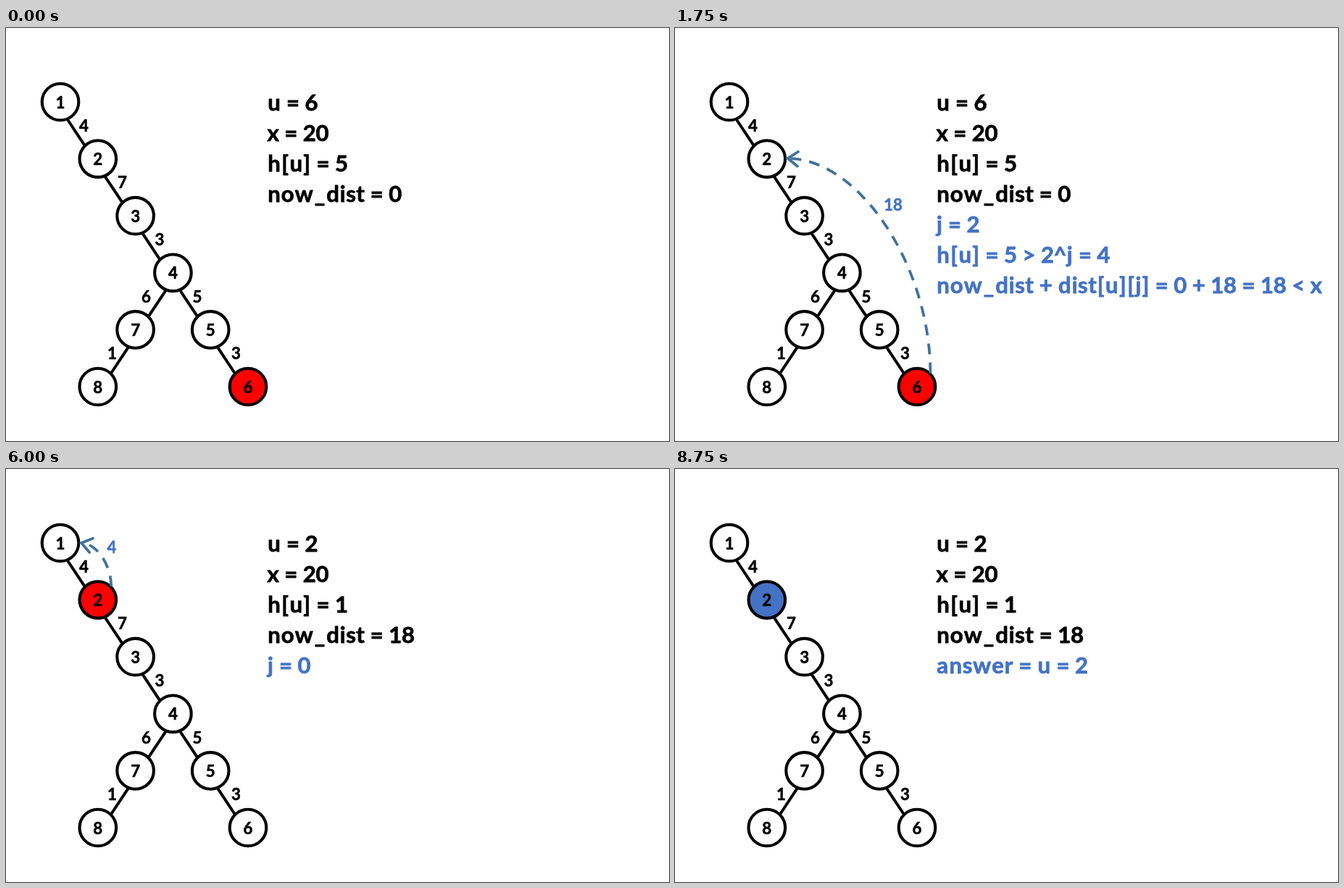
Recreate the animation shown at these times as an HTML page. Size 915x570 px, loop 10000 ms.

```html
<!DOCTYPE html>
<html lang="en">
<head>
<meta charset="utf-8">
<title>Binary lifting on a tree</title>
<style>
  html, body { margin: 0; width: 100%; height: 100%; overflow: hidden; background: #fff; }
  svg { display: block; width: 915px; height: 570px; }
  text { font-family: Lato, "Open Sans", sans-serif; font-weight: 700; text-anchor: middle; stroke-width: 0.025em; }
  .edge { stroke: #000; stroke-width: 4; }
  .node { stroke: #000; stroke-width: 4.1; }
  .jump { fill: none; stroke: #41719c; stroke-width: 3.75; }
</style>
</head>
<body>
<svg id="stage" viewBox="0 0 915 570"></svg>
<script>
const stage = document.getElementById("stage");
const BLUE = "#4472c4", RED = "#ff0000", DURATION = 10000;

// Character advances in thousandths of an em.
const advance = {
  " ": 226, "[": 325, "]": 325, "/": 430, N: 659, A: 606,
  a: 494, d: 537, e: 503, h: 537, i: 246, j: 255, n: 537, o: 538,
  r: 355, s: 399, t: 347, u: 537, w: 745, x: 459
};
for (const c of "0123456789") advance[c] = 507;
for (const c of "=+<>^_") advance[c] = 498;

// Tree position of each node: column, row.
const grid = { 1: [0, 0], 2: [1, 1], 3: [2, 2], 4: [3, 3], 5: [4, 4], 6: [5, 5], 7: [2, 4], 8: [1, 5] };
const place = id => [75 + 51.8 * grid[id][0], 102 + 78.6 * grid[id][1]];
// Parent, child, weight, x of the weight.
const edges = [
  [1, 2, 4, 107.5], [2, 3, 7, 160.5], [3, 4, 3, 212], [4, 7, 6, 193.5],
  [4, 5, 5, 264], [7, 8, 1, 146.5], [5, 6, 3, 317.5]
];

const far = { from: 6, tip: [155.5, 180], label: "18", at: [301, 244] };
const none = { from: 2, tip: [45, 32], label: "N/A", at: [142.5, 57] };
const near = { from: 2, tip: [104, 102], label: "4", at: [146, 108] };

const before = ["u = 6", "x = 20", "h[u] = 5", "now_dist = 0"];
const after = ["u = 2", "x = 20", "h[u] = 1", "now_dist = 18"];

const steps = [
  { start: 0, node: 6, known: before, notes: [] },
  { start: 1000, node: 6, known: before, notes: ["j = 2"], jump: far },
  { start: 1750, node: 6, known: before, jump: far,
    notes: ["j = 2", "h[u] = 5 > 2^j = 4", "now_dist + dist[u][j] = 0 + 18 = 18 < x"] },
  { start: 3750, node: 2, known: after, notes: ["j = 1"], jump: none },
  { start: 4500, node: 2, known: after, notes: ["j = 1", "h[u] = 1 < 2^j = 2"], jump: none },
  { start: 6000, node: 2, known: after, notes: ["j = 0"], jump: near },
  { start: 6750, node: 2, known: after, jump: near,
    notes: ["j = 0", "h[u] = 1 = 2^j = 1", "now_dist + dist[u][j] = 18 + 4 = 22 > x"] },
  { start: 8750, node: 2, known: after, notes: ["answer = u = 2"], fill: BLUE }
];

const escape = s => s.replace(/</g, "&lt;").replace(/>/g, "&gt;");

// Each character is centred in its own advance cell.
function text(str, x, y, em, color = "#000") {
  const xs = [...str].map(c => {
    const w = advance[c] * em / 1000;
    x += w;
    return (x - w / 2).toFixed(2);
  });
  return `<text x="${xs.join(" ")}" y="${y}" font-size="${em * 0.89}" fill="${color}" stroke="${color}">${escape(str)}</text>`;
}

function label(str, x, y, color) {
  const em = 25;
  const width = [...str].reduce((sum, c) => sum + advance[c] * em / 1000, 0);
  return text(str, x - width / 2, y + 8, em, color);
}

function drawEdge([parent, child, weight, labelX]) {
  const [x1, y1] = place(parent), [x2, y2] = place(child);
  const side = Math.sign(x2 - x1);
  return `<line class="edge" x1="${x1 + side * 10}" y1="${y1 + 24.5}" x2="${x2 - side * 18.5}" y2="${y2 - 19}"/>` +
    label(String(weight), labelX, (y1 + y2) / 2 - 6.5);
}

function drawNode(id, step) {
  const [x, y] = place(id);
  const fill = id == step.node ? step.fill || RED : "#fff";
  return `<circle class="node" cx="${x}" cy="${y}" r="25.3" fill="${fill}"/>` + label(id, x, y + 0.5);
}

function drawJump({ from, tip: [tx, ty], label: name, at }) {
  const [nx, ny] = place(from);
  const x = nx + 18.4, y = ny - 18.4, w = x - tx, h = y - ty;
  const turn = Math.atan(7 * h / (w * w)) * 180 / Math.PI;
  return `<path class="jump" stroke-dasharray="15 11.25" d="M${x} ${y}C${x} ${y - h / 2} ${tx + w / 2} ${ty} ${tx} ${ty}"/>` +
    `<path class="jump" stroke-linecap="round" d="M14 -10L0 0L14 10" transform="translate(${tx} ${ty}) rotate(${turn})"/>` +
    label(name, ...at, BLUE);
}

function draw(step) {
  const lines = [...step.known, ...step.notes];
  stage.innerHTML =
    edges.map(drawEdge).join("") +
    Object.keys(grid).map(id => drawNode(id, step)).join("") +
    (step.jump ? drawJump(step.jump) : "") +
    lines.map((s, i) => text(s, 360.6, 114 + 42 * i, 35, i < 4 ? "#000" : BLUE)).join("");
}

let shown;
const origin = performance.now();
function tick() {
  const t = (performance.now() - origin) % DURATION;
  const step = steps.filter(s => s.start <= t).pop();
  if (step !== shown) draw(shown = step);
  requestAnimationFrame(tick);
}
tick();
</script>
</body>
</html>
```
